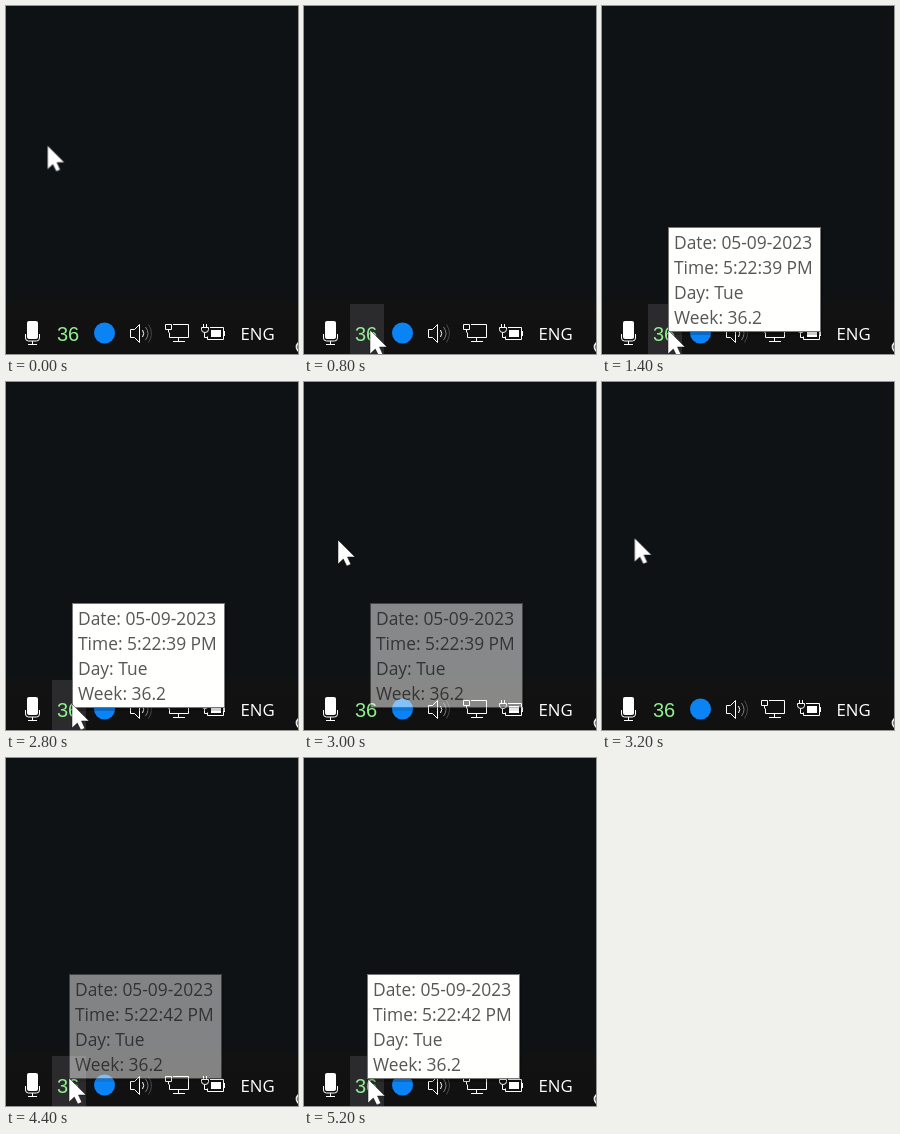
Recreate the animation shown at these times as an HTML page. Size 292 by 348 pixels, loop 5.4 s.

```html
<!DOCTYPE html>
<html lang="en">
<head>
<meta charset="utf-8">
<title>Tray week number</title>
<style>
html, body { margin: 0; width: 100%; height: 100%; overflow: hidden; background: #0e1215; }
svg { display: block; width: 292px; height: 348px; }
text { font-family: "Open Sans", "Noto Sans", sans-serif; }
.tip text { font-size: 17.4px; fill: #575757; }
.line { fill: none; stroke: #fff; stroke-width: 1; }

.cursor, .hover, .tip { animation: 5400ms step-end infinite; }
.cursor { animation-name: move; }
.hover { animation-name: hover; }
.first { animation-name: first; }
.second { animation-name: second; }

@keyframes move {
  0% { transform: translate(41.5px, 139.5px); }
  3.7% { transform: translate(41.5px, 127px); }
  7.4% { transform: translate(50px, 237px); }
  11.11% { transform: translate(75px, 311px); }
  14.81% { transform: translate(66px, 324px); }
  51.85% { transform: translate(66px, 322px); }
  55.55% { transform: translate(34px, 158px); }
  59.25% { transform: translate(32.5px, 156px); }
  62.96% { transform: translate(38px, 180px); }
  66.66% { transform: translate(53px, 257px); }
  70.37% { transform: translate(62px, 310px); }
  74.07% { transform: translate(63px, 320px); }
  96.29%, 100% { transform: translate(64px, 321px); }
}
@keyframes hover {
  0% { opacity: 0; }
  14.81% { opacity: 1; }
  55.55% { opacity: 0; }
  74.07%, 100% { opacity: 1; }
}
@keyframes first {
  0% { opacity: 0; }
  22.22% { opacity: .33; }
  25.92% { opacity: 1; }
  55.55% { opacity: .5; }
  59.25%, 100% { opacity: 0; }
}
@keyframes second {
  0% { opacity: 0; }
  81.48% { opacity: .48; }
  85.18%, 100% { opacity: 1; }
}
</style>
</head>
<body>
<svg viewBox="0 0 292 348">
  <defs>
    <linearGradient id="bar" x2="0" y2="1">
      <stop offset="0" stop-color="#0f1214"/>
      <stop offset=".2" stop-color="#131213"/>
      <stop offset="1" stop-color="#121112"/>
    </linearGradient>
    <g id="box">
      <rect x="3" y="3" width="152" height="105" fill="#000" opacity=".2"/>
      <rect x=".5" y=".5" width="152" height="104" fill="#fffffd" stroke="#767676"/>
    </g>
  </defs>

  <rect width="292" height="348" fill="#0e1215"/>
  <rect y="292" width="292" height="56" fill="url(#bar)"/>
  <rect class="hover" x="46" y="298" width="34" height="50" fill="#2b2b2d"/>

  <!-- microphone -->
  <rect x="21" y="315" width="11" height="18" rx="2" fill="#fff"/>
  <path class="line" d="M19.5 328v4q0 3 3 3h8q3 0 3-3v-4M26.5 335v4M22 338.5h9"/>

  <text x="51" y="335" font-size="20" fill="#90ee90" style="font-family:'Liberation Sans',Arial,sans-serif">36</text>
  <circle cx="98.5" cy="327" r="10.5" fill="#0a84f5"/>

  <!-- speaker -->
  <path class="line" d="M124.5 323.5h4l5-5v18l-5-5h-4z"/>
  <path class="line" d="M136.5 324q2.5 3.5 0 7"/>
  <path class="line" d="M139.5 321q5 6.5 0 13" opacity=".45"/>
  <path class="line" d="M142.5 318.5q6 9 0 18" opacity=".22"/>

  <!-- network -->
  <path class="line" d="M167 318.5h15.5v13h-19v-5M172.5 332v4M167 335.5h12"/>
  <path class="line" d="M159.5 318.5h6v5h-6zM162.5 323.5v3"/>

  <!-- battery -->
  <path class="line" d="M204 321.5h13.5v12h-16v-3M218.5 325v5"/>
  <rect x="205" y="324" width="10" height="7" fill="#fff"/>
  <path class="line" d="M197.500 318v3.500M200.500 318v3.500M195.500 321.500h7v2q0 3-3.500 3t-3.500-3zM198.500 327v4.500h3"/>

  <text x="234.5" y="334" font-size="16.800" fill="#fff">ENG</text>
  <circle cx="296" cy="341" r="5.500" fill="none" stroke="#e8e8e8" stroke-width="1.800"/>

  <g transform="translate(66 221)">
    <g class="tip first">
      <use href="#box"/>
      <text x="6" y="22">Date: 05-09-2023</text>
      <text x="6" y="47">Time: 5:22:39 PM</text>
      <text x="6" y="72">Day: Tue</text>
      <text x="6" y="97">Week: 36.2</text>
    </g>
  </g>
  <g transform="translate(63 216)">
    <g class="tip second">
      <use href="#box"/>
      <text x="6" y="22">Date: 05-09-2023</text>
      <text x="6" y="47">Time: 5:22:42 PM</text>
      <text x="6" y="72">Day: Tue</text>
      <text x="6" y="97">Week: 36.2</text>
    </g>
  </g>

  <path class="cursor" d="M0 0V24L5.300 19 8.800 26 12.800 24.200 9.500 17H17z" fill="#fff" stroke="#111" stroke-width=".5"/>
</svg>
</body>
</html>
```
